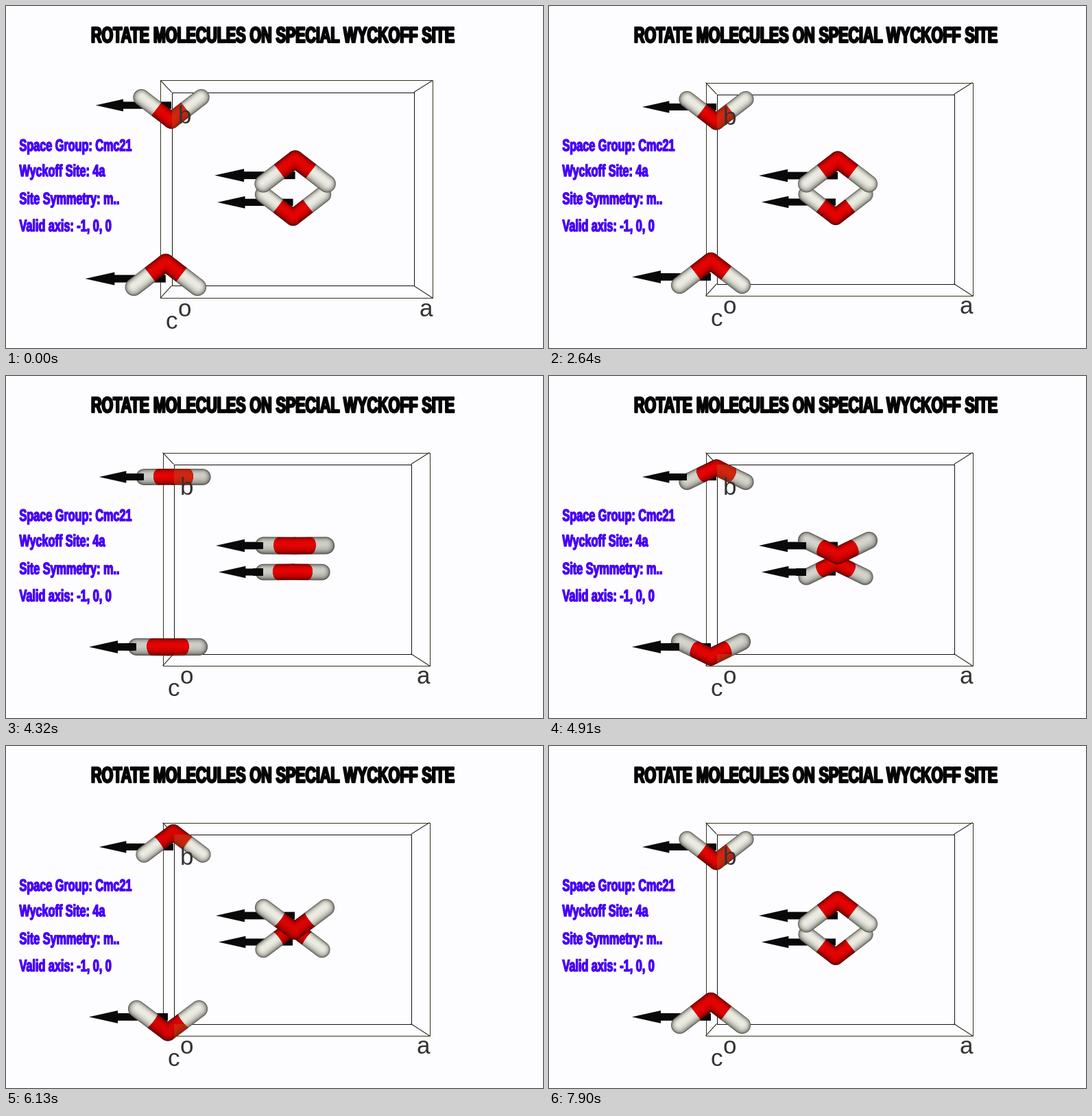
A matplotlib script for the animation above (8000 ms loop, 783 by 498 pixels).

```python
import numpy as np
import matplotlib.pyplot as plt
from matplotlib.animation import FuncAnimation
from matplotlib.collections import LineCollection, PolyCollection
from matplotlib.patches import PathPatch, Rectangle
from matplotlib.textpath import TextPath
from matplotlib.transforms import Affine2D

W, H, DPI = 783, 498, 100
PX = 72 / DPI
LOOP, STEP = 8000, 40

fig = plt.figure(figsize=(W / DPI, H / DPI), dpi=DPI, facecolor="#fdfdff")
ax = fig.add_axes([0, 0, 1, 1])
ax.set_xlim(0, W)
ax.set_ylim(H, 0)
ax.axis("off")

zoom = Affine2D()
view = zoom + ax.transData


# ---- captions in a heavy condensed face ----
CONDENSE = 0.67


def caption(x, y, text, size, color, weight):
    glyphs = TextPath((0, 0), text, size=size,
                      prop={"family": "Liberation Sans", "weight": "bold"})
    place = Affine2D().scale(CONDENSE, -1).translate(x, y)
    ax.add_patch(PathPatch(place.transform_path(glyphs), facecolor=color,
                           edgecolor=color, lw=weight * PX,
                           joinstyle="round", zorder=6))


caption(124, 53, "ROTATE MOLECULES ON SPECIAL WYCKOFF SITE", 32, "#050505", 2.3)
for y, line in [(211, "Space Group: Cmc21"), (248, "Wyckoff Site: 4a"),
                (288.5, "Site Symmetry: m.."), (328, "Valid axis: -1, 0, 0")]:
    caption(19.5, y, line, 24.2, "#4600f8", 1.3)


# ---- unit cell ----
def corners(x0, y0, x1, y1):
    return [(x0, y0), (x1, y0), (x1, y1), (x0, y1)]


near_face = corners(228.5, 111.5, 617.5, 422)
far_face = corners(244.5, 128.5, 590.5, 404.5)
for lines, color in [
    ([far_face + far_face[:1]] + [list(p) for p in zip(near_face, far_face)], "#101010"),
    ([near_face + near_face[:1]], "#33331a"),
]:
    ax.add_collection(LineCollection(lines, colors=color, linewidths=PX,
                                     transform=view, zorder=1), autolim=False)

for name, x, y in [("a", 608, 448), ("o", 263, 448), ("c", 244.5, 466), ("b", 263, 173)]:
    ax.text(x, y, name, ha="center", va="baseline", color="#333333",
            family="Liberation Sans", fontsize=35 * PX, transform=view, zorder=5)


# ---- molecules: centre x, axis y, scale, side of the oxygen; far ones first ----
MOLECULES = [(244, 147, 0.94, 1), (418, 285.5, 0.94, 1),
             (236, 394.5, 1.0, -1), (421, 247, 1.0, -1)]
OXY, HYD, SPREAD, RADIUS = 23, 12, 45.5, 12.6
LAYERS = [1, 0.95, 0.88, 0.78, 0.65, 0.48, 0.28]
LIFT = 0.25  # how far the highlight sits above the middle
RED = np.array([[0.16, 0, 0], [0.9, 0.01, 0.01]])
WHITE = np.array([[0.18, 0.18, 0.16], [0.93, 0.925, 0.89]])
BLACK = np.array([0.03, 0.035, 0.03])


def half_bond(atom, mid, r, bulge, w):
    """Rounded at the atom, cut by an elliptic edge at the bond's middle."""
    u = (mid - atom) / np.hypot(*(mid - atom))
    v = np.array([-u[1], u[0]])
    shift = -v * v[1] * LIFT * r * (1 - w)
    s = np.linspace(-w, w, 13)
    cut = mid + np.outer(bulge * np.sqrt(1 - s**2), u) + np.outer(s * r, v)
    a = np.linspace(np.pi / 2, -np.pi / 2, 15)
    cap = atom + r * w * (np.outer(-np.cos(a), u) + np.outer(np.sin(a), v))
    return np.vstack([cut, cap]) + shift


def shaded(atoms, mids, r, bulge, tones, light):
    """Nested layers, so that both arms join without a seam."""
    out = []
    for w, inner in zip(LAYERS, LAYERS[1:] + [0]):
        lit = np.sqrt(1 - ((w + inner) / 2) ** 2)
        color = (tones[0] + (tones[1] - tones[0]) * lit) * light
        out += [(half_bond(a, m, r, bulge, w), color) for a, m in zip(atoms, mids)]
    return out


def arrow(x, y, k):
    tip, neck, head, bar = x - 115 * k, x - 73 * k, 9.3 * k, 5.4 * k
    return [(tip, y), (neck, y - head), (neck, y - bar), (x, y - bar),
            (x, y + bar), (neck, y + bar), (neck, y + head)]


def molecule(x, y, k, side, angle):
    c, s = np.cos(angle), np.sin(angle)
    oxygen = np.array([x, y + side * OXY * k * c])
    hydrogens = [np.array([x + d * SPREAD * k, y - side * HYD * k * c]) for d in (-1, 1)]
    mids = [(oxygen + h) / 2 for h in hydrogens]
    r = RADIUS * k
    bulge = r * abs(s) * (OXY + HYD) / np.hypot(SPREAD, OXY + HYD)
    o_front = s > 0
    red = shaded([oxygen] * 2, mids, r, bulge if o_front else 0, RED,
                 1 - 0.2 * max(-s, 0))
    white = shaded(hydrogens, mids, r, 0 if o_front else bulge, WHITE,
                   1 - 0.13 * max(s, 0))
    far, near = (white, red) if o_front else (red, white)

    # the stretch of shaft that passes in front of the far atoms
    shaft = []
    if abs(s) > 0.3:
        x0, x1 = (x - 62 * k, x - 46 * k) if o_front else (x - 13 * k, x)
        shaft = [(corners(x0, y - 5.4 * k, x1, y + 5.4 * k), BLACK)]
    parts = [(arrow(x, y, k), BLACK)] + far + shaft + near
    tint = half_bond(oxygen, mids[1], r, bulge if o_front else 0, 1)
    return parts, tint


shapes = PolyCollection([], transform=view, edgecolors="none", zorder=2)
ax.add_collection(shapes, autolim=False)

# red bonds look browner inside the cell's far corner regions
tints = {}
for index, top in [(0, 128.5), (2, 404.5)]:
    layer = PolyCollection([], transform=view, facecolors=(0.72, 0.36, 0.14, 0.4),
                           edgecolors="none", zorder=3)
    ax.add_collection(layer, autolim=False)
    layer.set_clip_path(Rectangle((244.5, top), 60, 70, transform=view))
    tints[index] = layer


# ---- motion: time in ms and angle in degrees ----
TURN = [(20, 0), (810, 170), (890, 180), (1630, 320), (2020, 360), (2890, 360),
        (3710, 406), (4460, 459), (4910, 490), (5110, 490), (5890, 538),
        (5990, 540), (6530, 586), (6859, 586), (6860, 668), (7630, 710), (7900, 720)]
TIMES, ANGLES = zip(*TURN)


def angle_at(t):
    deg = np.interp(t, TIMES, ANGLES)
    if t < 2500:
        deg = 10 * round(deg / 10)
    return np.radians(deg)


def draw(frame):
    t = frame * STEP + STEP / 2
    scale = np.interp(t, [2100, 2500], [1 / 0.98, 1])
    zoom.clear().translate(-391, -267).scale(scale).translate(391, 267)
    angle = angle_at(t)
    parts = []
    for i, spec in enumerate(MOLECULES):
        pieces, tint = molecule(*spec, angle)
        parts += pieces
        if i in tints:
            tints[i].set_verts([tint])
    verts, colors = zip(*parts)
    shapes.set_verts(verts)
    shapes.set_facecolor([tuple(c) for c in colors])
    return [shapes, *tints.values()]


anim = FuncAnimation(fig, draw, frames=LOOP // STEP, interval=STEP,
                     repeat=True, repeat_delay=0, blit=False)
plt.show()
```
